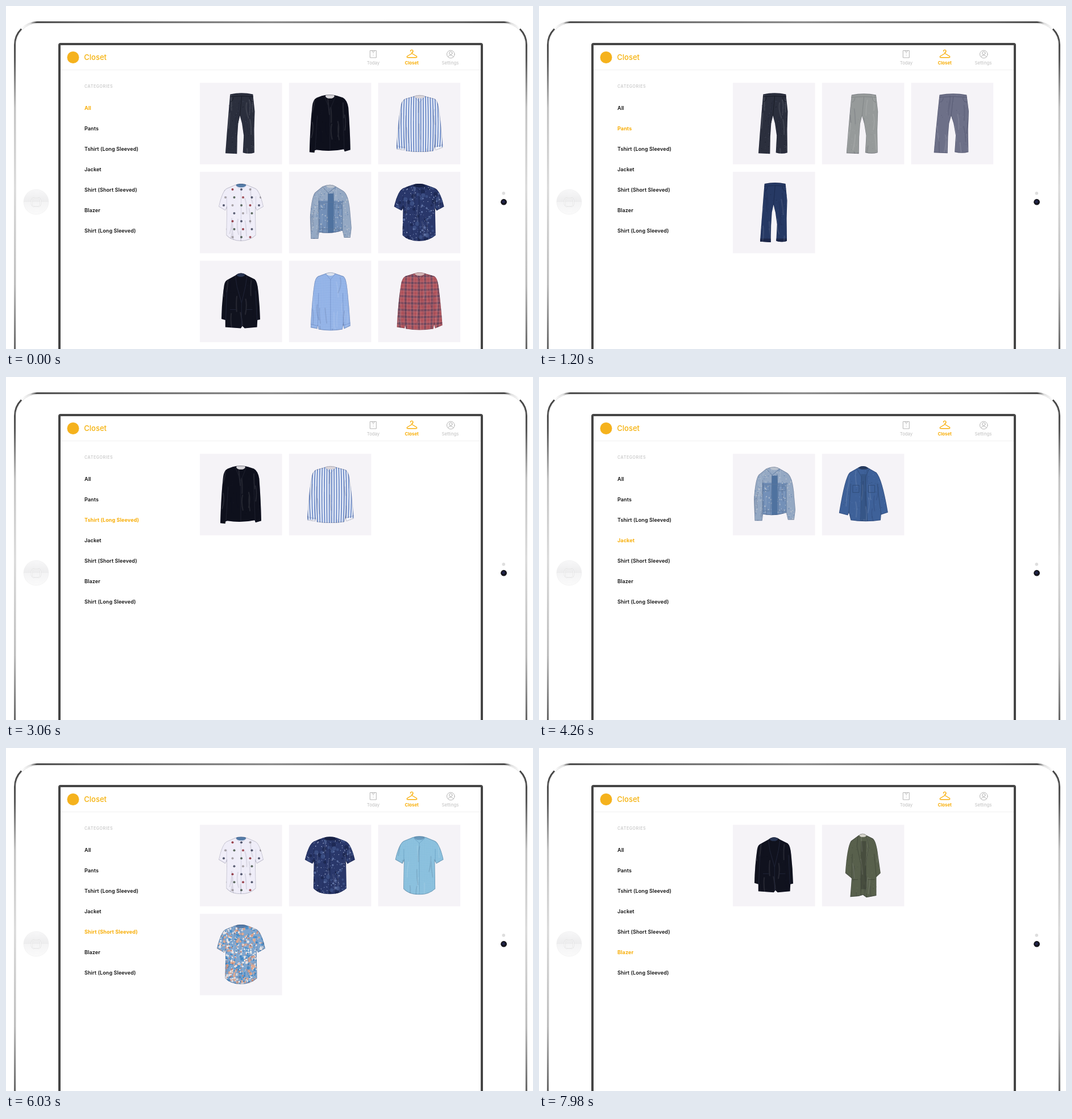
An HTML page for the animation above (8 s loop, 927 by 604 pixels).

```html
<!DOCTYPE html>
<html lang="en">
<head>
<meta charset="utf-8">
<title>Closet</title>
<style>
html, body { margin: 0; width: 100%; height: 100%; overflow: hidden; background: #fff; }
svg { display: block; width: 927px; height: 604px; font-family: Inter, "Open Sans", sans-serif; }
.menu text { font-size: 9px; font-weight: 600; letter-spacing: .1px; fill: #111; }
.menu .on { font-weight: 700; fill: #f8ae08; }
.nav { font-size: 7.75px; text-anchor: middle; fill: #bfbfbf; }
.icon { fill: none; stroke: #b5b5b5; stroke-linecap: round; stroke-linejoin: round; }
</style>
</head>
<body>
<svg viewBox="0 0 927 604">
  <defs>
    <linearGradient id="side" gradientUnits="userSpaceOnUse" x1="0" y1="38" x2="0" y2="604">
      <stop offset="0" stop-color="#444"/><stop offset=".1" stop-color="#5a5a5a"/>
      <stop offset=".25" stop-color="#c4c4c4"/><stop offset=".5" stop-color="#dcdcdc"/>
      <stop offset=".8" stop-color="#bdbdbd"/><stop offset="1" stop-color="#666"/>
    </linearGradient>
    <linearGradient id="top" gradientUnits="userSpaceOnUse" x1="27" y1="0" x2="904" y2="0">
      <stop offset="0" stop-color="#fff"/><stop offset=".018" stop-color="#ddd"/>
      <stop offset=".03" stop-color="#4a4a4a"/><stop offset=".12" stop-color="#606060"/>
      <stop offset=".5" stop-color="#8a8a8a"/><stop offset=".88" stop-color="#606060"/>
      <stop offset=".97" stop-color="#4a4a4a"/><stop offset=".982" stop-color="#ddd"/>
      <stop offset="1" stop-color="#fff"/>
    </linearGradient>
    <linearGradient id="button" x1="0" y1="0" x2="0" y2="1">
      <stop offset="0" stop-color="#f7f7f8"/><stop offset=".5" stop-color="#ececed"/>
      <stop offset=".51" stop-color="#f4f4f5"/><stop offset="1" stop-color="#fafafa"/>
    </linearGradient>
  </defs>

  <g fill="none" stroke-width="3">
    <path d="M15.500 604V68.500A40 40 0 0 1 27.200 40.200M915.500 604V68.500A40 40 0 0 0 903.800 40.200" stroke="url(#side)"/>
    <path d="M27.200 40.200A40 40 0 0 1 55.500 28.500H875.500A40 40 0 0 1 903.800 40.200" stroke="url(#top)"/>
    <path d="M17.500 604V68.500A38 38 0 0 1 55.500 30.500H875.500A38 38 0 0 1 913.500 68.500V604" stroke="#e3e3e3" stroke-width="1"/>
  </g>
  <circle cx="53" cy="345" r="22" fill="url(#button)" stroke="#eee" stroke-width=".6"/>
  <rect x="45.5" y="338" width="15" height="15" rx="4" fill="none" stroke="#d9d9da" stroke-width="2"/>
  <rect x="45.5" y="338" width="15" height="15" rx="4" fill="none" stroke="#fff"/>
  <circle cx="875.3" cy="329.8" r="2.8" fill="#dedede"/>
  <circle cx="875.6" cy="345.2" r="5.4" fill="#15151d"/>
  <circle cx="875.2" cy="344.6" r="2.6" fill="#20244a"/>
  <rect x="94" y="67" width="743" height="560" rx="2" fill="#fff" stroke="#454545" stroke-width="4"/>

  <path d="M96 112.5H835" stroke="#f1f1f1"/>
  <circle cx="118" cy="90.5" r="10.5" fill="#f5b21d"/>
  <text x="137.3" y="95.2" font-size="13" font-weight="500" fill="#f5b10a">Closet</text>
  <g class="icon">
    <path d="M640.7 78.5H651.3V91H640.7ZM643.5 78.5L646 82L648.5 78.5M646 84v.3M646 87v.3"/>
    <path d="M711.5 79.5A2.2 2.2 0 1 1 714 81.8V83.5L722.3 88.5Q723.5 90.8 721 90.8H707Q704.5 90.8 705.7 88.5L714 83.5" stroke="#f8ae08" stroke-width="1.4"/>
    <circle cx="782.3" cy="85" r="6.8"/><circle cx="782.3" cy="83" r="2.7"/>
    <path d="M777.5 89.6Q779 86.6 782.3 86.6T787.1 89.6"/>
  </g>
  <g class="nav">
    <text x="646" y="102.5">Today</text>
    <text x="713.7" y="102.5" font-weight="700" fill="#f8ae08">Closet</text>
    <text x="781.5" y="102.5">Settings</text>
  </g>
  <text x="138" y="144.3" font-size="7" font-weight="600" letter-spacing=".6" fill="#ccc">CATEGORIES</text>
  <g class="menu" id="menu"></g>
  <g id="views"></g>
</svg>
<script>
const LOOP = 8000;

let seed = 7;
const rnd = () => (seed = seed * 16807 % 2147483647) / 2147483647;
const spot = size => +(rnd() * size).toFixed(1);

// Outlines and seams on a 100 x 100 grid, scaled to each garment's box
const shapes = {
  pants: ['M16 2Q55 -2 93 2L99 30L97 60L98 98Q80 101 59 98L62 70L56 50L49 37L43 50L40 72L39 100L0 99L5 66L11 30Z',
    'M15 6Q55 4 94 6M55 5L49 37M17 14Q24 15 27 7M94 14Q84 15 82 7'],
  knit: ['M30 2Q50 -2 68 2L82 5Q92 9 95 22Q99 60 100 95L86 98L84 94Q50 99 17 95L13 96L12 100L0 99Q2 50 7 19Q9 8 18 5Z',
    'M36 2L50 26L64 2M50 26V96M19 36L14 95M82 36L85 94'],
  long: ['M36 3Q50 -2 64 3L82 7Q88 9 91 22Q96 50 100 92L84 97L82 90L80 98Q50 102 20 98L18 91L17 97L0 95Q3 50 9 22Q11 10 19 7Z',
    'M38 3L50 13L62 3M50 13V99M20 36L18 92M81 36L82 92M0 89L17 92M100 87L83 91'],
  short: ['M36 2Q50 -2 64 2L82 8Q92 12 100 40L85 47L82 42L83 90Q70 100 50 100Q28 100 17 90L18 42L15 47L0 40Q8 12 18 8Z',
    'M38 3L50 12L62 3M50 12V99M18 22V44M83 22V44'],
  jacket: ['M30 4Q50 -2 62 4L80 12Q92 18 96 45L100 80L97 98L82 98L78 85Q50 92 22 88L20 100L2 100L0 60Q4 18 14 14Z',
    'M30 5L44 16L62 5M44 16L40 89M56 14L60 88M20 33H78M22 36h15v9h-15ZM60 36h15v9h-15ZM21 30L22 86M78 30V85M22 82H78'],
  over: ['M40 3Q50 -2 60 4L76 12Q88 22 100 84L86 88L85 98Q55 102 24 98L20 84L18 89L0 85Q12 20 22 12Z',
    'M36 5L46 20L44 99M62 5L54 20L58 99M24 32L20 86M78 32L86 88M28 35h13v13h-13ZM60 35h13v13h-13Z'],
  blazer: ['M36 4Q50 -4 66 4L86 11Q93 15 95 32Q99 58 100 84L93 85L92 98L60 100L54 96L50 100L10 98L10 85L0 83Q1 50 7 22Q9 13 18 11Z',
    'M36 5L40 24L52 54L62 24L66 5M52 54V96M14 32L11 85M88 32L92 85M22 66H38M64 66H80'],
  coat: ['M38 3Q50 -2 60 3L78 8Q88 12 93 35L100 62L88 68L88 97L60 100L50 96L38 98L14 99L18 70L0 62Q5 22 16 12Z',
    'M36 4L33 20L45 50L44 97M60 4L66 20L58 50L60 99M20 32L18 70M82 32L88 68M20 72H36M64 72H84']
};

const dot = (x, y, r) => `M${x - r} ${y}a${r} ${r} 0 1 0 ${2 * r} 0a${r} ${r} 0 1 0 ${-2 * r} 0`;

// Textures: each takes the garment's size and returns markup
const specks = (n, r, ...colors) => (w, h) => colors.map(c => {
  let d = '';
  for (let i = 0; i < n; i++) d += dot(spot(w), spot(h), +(r * (.4 + rnd() * .6)).toFixed(2));
  return `<path d="${d}" fill="${c}"/>`;
}).join('');
const lines = (step, width, color, across) => (w, h) => {
  let d = '';
  for (let p = step / 2; p < (across ? h : w); p += step)
    d += across ? `M0 ${p}q${w / 2} 3 ${w} 0` : `M${p} 0q${(p - w / 2) * .12} ${h / 2} 0 ${h}`;
  return `<path d="${d}" fill="none" stroke="${color}" stroke-width="${width}"/>`;
};
const dots = w => {
  let s = '';
  for (let j = 0; j < 7; j++) for (let i = 0; i < 5; i++)
    s += `<path d="${dot(9 + i * 15.5 + j % 2 * 3, 10 + j * 14, 2)}" fill="${['#5b6a5f', '#9a4650', '#565a70', '#a8a3a8'][(i + j * 3) % 4]}"/>`;
  return s;
};
const panel = (x, y, w, h, color) => (W, H) =>
  `<rect x="${x * W}" y="${y * H}" width="${w * W}" height="${h * H}" fill="${color}"/>`;
const folds = (w, h) => ['#fff', '#002'].map(c => {
  let d = '';
  for (let i = 0; i < 9; i++) d += `M${spot(w)} ${spot(h)}q${spot(8) - 4} 12 ${spot(8) - 4} 28`;
  return `<path d="${d}" fill="none" stroke="${c}" stroke-width="2" opacity=".09"/>`;
}).join('');

// shape, x, y, w, h, colour, seam colour, neck colour, textures
const closet = {
  jeans: ['pants', 45, 18, 52, 107, '#2b2f3d', '#161923', '', specks(60, .7, '#41475a', '#191c28')],
  grey: ['pants', 43, 19, 56, 106, '#969a9a', '#7f8485', '', specks(40, .7, '#a4a8a8', '#888c8d')],
  slate: ['pants', 40, 19, 62, 105, '#6d7088', '#565a73', '', specks(50, .8, '#7b7d95', '#5e617a')],
  jogger: ['pants', 48, 19, 48, 105, '#263964', '#1a2a4f', '', specks(40, .8, '#304674', '#1e2e54'), panel(0, .94, 1, .06, '#1c2749')],
  cardigan: ['knit', 36, 21, 72, 102, '#0e101c', '#20222f', '#d8d6da', specks(40, .5, '#1d2030', '#05060d')],
  striped: ['long', 32, 21, 82, 101, '#e9eef8', 'rgba(60,80,130,.3)', '#d9d4d8', lines(4.1, 1.8, '#6a88c6'), panel(0, .94, .17, .06, '#f5f5fa'), panel(.83, .91, .17, .09, '#f5f5fa')],
  dotted: ['short', 33, 21, 79, 101, '#efedf8', 'rgba(90,90,130,.2)', '#557ca8', dots],
  denim: ['jacket', 37, 22, 73, 96, '#94a8c3', '#5b779c', '#bac3cf', panel(.21, .3, .57, .6, '#7390b8'), specks(100, 1.2, '#a9b8cb', '#7590b5', '#b8c1cd'), panel(.43, .17, .14, .72, '#4f729f')],
  galaxy: ['short', 28, 21, 88, 101, '#29376a', 'rgba(8,14,40,.4)', '#172145', specks(40, 4, '#1e2a55', '#3a4d82'), specks(22, 2.5, '#5b6ea2'), specks(110, .8, '#7f92be', '#b4bfda')],
  blazer: ['blazer', 38, 22, 68, 97, '#10121e', '#22263a', '#283552', specks(35, .5, '#1d2030', '#080a13')],
  blue: ['long', 38, 20, 70, 103, '#91b2e8', 'rgba(55,85,150,.3)', '#dce2ed', lines(2.5, .6, '#b0c8ee'), lines(3, .4, '#7b9fd8', 1)],
  plaid: ['long', 33, 20, 80, 102, '#b0525a', 'rgba(60,20,40,.3)', '#d4b5b5', lines(11, 3.5, 'rgba(70,72,100,.45)'), lines(12, 3.5, 'rgba(70,72,100,.4)', 1), lines(5.5, .5, '#c27c82'), lines(6, .5, '#c27c82', 1)],
  over: ['over', 30, 21, 86, 98, '#3e6199', '#2f4c78', '#263b5f', specks(60, 1, '#496da6', '#365689'), panel(.45, .15, .11, .85, '#365687')],
  sky: ['short', 30, 20, 85, 103, '#8ac0de', 'rgba(45,100,145,.3)', '#6b9bbd', lines(2.7, .6, '#a3cfe6'), lines(2.7, .5, '#79b4d5', 1)],
  floral: ['short', 30, 19, 85, 105, '#7fa6cf', 'rgba(55,75,125,.2)', '#557ca9', specks(110, 2.8, '#e3dfe2', '#4d90ca', '#dba994'), specks(110, 1.5, '#f1ede9', '#3f82be', '#c9806f')],
  coat: ['coat', 41, 15, 62, 113, '#58604c', '#434a3c', '#d7d6cc', specks(55, .8, '#666e58', '#4b5341'), panel(.44, .12, .15, .75, '#474d3e')]
};

function garment(name) {
  const [shape, x, y, w, h, color, seam, neck, ...textures] = closet[name];
  const [outline, seams] = shapes[shape];
  const scale = `transform="scale(${w / 100} ${h / 100})"`;
  return `<g id="${name}" transform="translate(${x} ${y})">
    <clipPath id="${name}-cut"><path d="${outline}" ${scale}/></clipPath>
    <path d="${outline}" ${scale} fill="${color}"/>
    <g clip-path="url(#${name}-cut)">${[...textures, folds].map(f => f(w, h)).join('')}
      ${neck ? `<ellipse cx="${w / 2}" cy="2.5" rx="${w * .11}" ry="4" fill="${neck}"/>` : ''}
      <path d="${outline}" ${scale} fill="none" stroke="rgba(0,0,30,.2)" stroke-width="2"/>
    </g>
    <path d="${seams}" ${scale} fill="none" stroke="${seam}" stroke-width=".9" vector-effect="non-scaling-stroke"/>
  </g>`;
}

const views = [
  { at: 0, label: 'All', items: 'jeans cardigan striped dotted denim galaxy blazer blue plaid' },
  { at: 1130, label: 'Pants', items: 'jeans grey slate jogger' },
  { at: 2520, label: 'Tshirt (Long Sleeved)', items: 'cardigan striped' },
  { at: 3870, label: 'Jacket', items: 'denim over' },
  { at: 5880, label: 'Shirt (Short Sleeved)', items: 'dotted galaxy sky floral' },
  { at: 7290, label: 'Blazer', items: 'blazer coat' }
];

const $ = id => document.getElementById(id);
const tile = (name, i) => `<g transform="translate(${341 + i % 3 * 156.8} ${135.3 + (i / 3 | 0) * 156.6})">
  <rect width="144.6" height="143.5" fill="#f5f3f7"/><use href="#${name}"/></g>`;

document.querySelector('defs').insertAdjacentHTML('beforeend', Object.keys(closet).map(garment).join(''));
$('menu').innerHTML = [...views.map(v => v.label), 'Shirt (Long Sleeved)']
  .map((label, i) => `<text x="138" y="${183 + i * 36}">${label}</text>`).join('');
$('views').innerHTML = views.map(v => `<g>${v.items.split(' ').map(tile).join('')}</g>`).join('');

function draw() {
  const t = performance.now() % LOOP;
  const now = views.filter(v => v.at <= t).length - 1;
  views.forEach((v, i) => {
    $('menu').children[i].classList.toggle('on', i === now);
    $('views').children[i].style.display = i === now ? '' : 'none';
  });
  requestAnimationFrame(draw);
}
draw();
</script>
</body>
</html>
```
